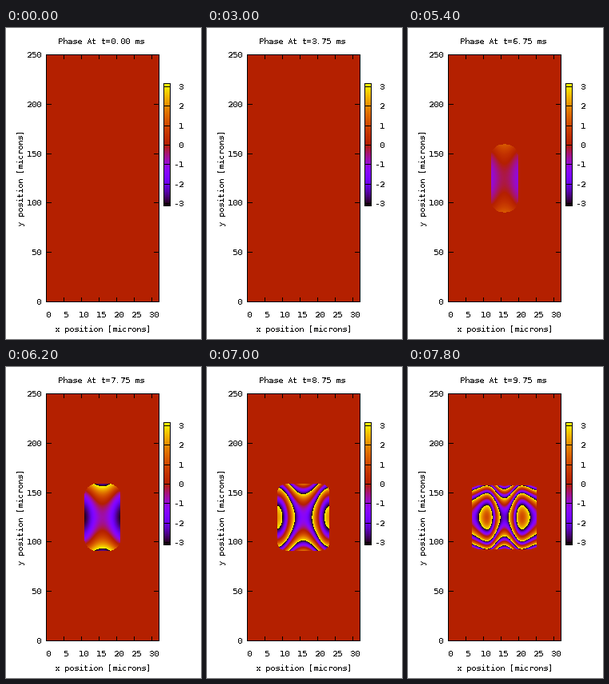
Animation of 244x389 px, one loop 8 s. Source, as a matplotlib script:

```python
import numpy as np
import matplotlib.pyplot as plt
from matplotlib.animation import FuncAnimation
from matplotlib.patches import Rectangle

W, H, DPI = 244, 389, 100
FRAMES, STEP = 40, 200
LEFT, RIGHT, TOP, BOTTOM = 50, 191, 33, 342
CX, CY = 120.7, 188
RELEASE = 5.0  # ms

plt.rcParams.update({
    "font.family": "DejaVu Sans Mono",
    "font.size": 10 * 72 / DPI,
    "text.antialiased": False,
    "text.hinting": "native",
    "text.hinting_factor": 1,
})

fig = plt.figure(figsize=(W / DPI, H / DPI), dpi=DPI, facecolor="white")
ax = fig.add_axes([0, 0, 1, 1])
ax.axis("off")


def line(x0, y0, x1, y1):
    """One-pixel line through whole pixels, both ends included."""
    ax.add_patch(Rectangle((x0, y0), x1 - x0 + 1, y1 - y0 + 1, fc="black",
                           lw=0, antialiased=False, zorder=3))


def box(x0, y0, x1, y1):
    for y in (y0, y1):
        line(x0, y, x1, y)
    for x in (x0, x1):
        line(x, y0, x, y1)


def label(x, y, s, ha="center", **kw):
    return ax.text(x, y, s, ha=ha, va="baseline", **kw)


# Pixel distances from the middle of the cloud
X = np.abs(np.arange(LEFT, RIGHT + 1) + .5 - CX)[None, :]
Y = np.abs(np.arange(TOP, BOTTOM + 1) + .5 - CY)[:, None]

# Cloud shape against time since release
S = [0, 1, 1.75, 2.5, 2.75, 3.75, 4, 4.75]
HALF_W = [15, 15.5, 17, 20.5, 22.5, 32.5, 35.5, 40.5]
HALF_H = [42.5, 42.5, 42.5, 42, 42, 41.5, 41, 39.5]
CORNER = [15, 15, 15, 15, 15, 10, 8, 3]
DIP_X = [18, 18, 20, 24.5, 26, 34, 31, 22]
DEPTH = [0, .2, .8, 1.8, 2.4, 9.2, 9.3, 9.4]


def phase(t):
    s = t - RELEASE
    if s <= 0:
        return np.zeros((Y.size, X.size))
    w, h, r, p, d = (np.interp(s, S, v)
                     for v in (HALF_W, HALF_H, CORNER, DIP_X, DEPTH))
    u = X / p
    phi = (-.095 * s ** 2 + .00024 * s ** 2.35 * Y ** 2
           - 2 * d * u ** 2 / (1 + u ** 4))
    phi = (phi + np.pi) % (2 * np.pi) - np.pi
    dx, dy = np.maximum(X - w + r, 0), np.maximum(Y - h + r, 0)
    return np.where(np.hypot(dx, dy) <= r, phi, 0)


scale = dict(cmap="gnuplot", vmin=-np.pi, vmax=np.pi,
             interpolation="nearest", aspect="auto")
field = ax.imshow(phase(0), extent=(LEFT, RIGHT + 1, BOTTOM + 1, TOP), **scale)
ax.imshow(np.linspace(np.pi, -np.pi, 154)[:, None],
          extent=(197, 206, 223, 69), **scale)
ax.set_xlim(0, W)
ax.set_ylim(H, 0)

box(LEFT, TOP, RIGHT, BOTTOM)
for v in range(0, 31, 5):
    x = round(LEFT + (RIGHT - LEFT) * v / 32)
    line(x, BOTTOM - 5, x, BOTTOM)
    line(x, TOP, x, TOP + 5)
    label(x + 3, 362, str(v))
for v in range(0, 251, 50):
    y = round(BOTTOM - (BOTTOM - TOP) * v / 250)
    line(LEFT, y, LEFT + 6, y)
    line(RIGHT - 6, y, RIGHT, y)
    label(44, y + 4, str(v), "right")

box(197, 69, 205, 222)
for v in range(-3, 4):
    y = round(146 - 24.4 * v)
    line(197, y, 205, y)
    label(222, y + 4, str(v), "right")

label(121, 380, "x position [microns]")
label(22, 188, "y position [microns]", rotation=90, rotation_mode="anchor")
title = label(65, 20, "", "left")


def draw(i):
    t = i * .25
    field.set_data(phase(t))
    title.set_text(f"Phase At t={t:.2f} ms")
    return field, title


anim = FuncAnimation(fig, draw, frames=FRAMES, interval=STEP, repeat=True,
                     repeat_delay=0, blit=False)
plt.show()
```
